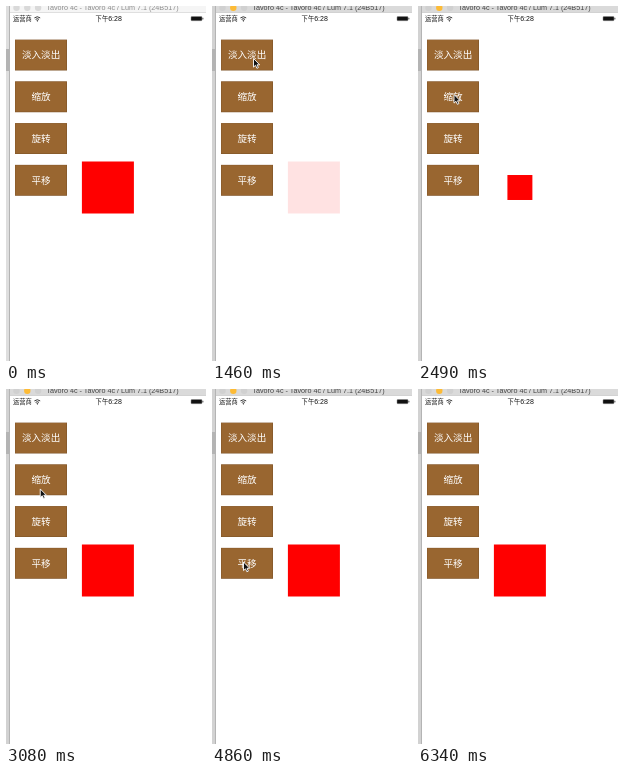
An HTML page for the animation above (6.99 s loop, 200 px wide and 355 px high).

```html
<!DOCTYPE html>
<html lang="zh">
<head>
<meta charset="utf-8">
<style>
  html, body { margin: 0; width: 100%; height: 100%; overflow: hidden; background: #fff; }
  svg { display: block; width: 100vw; height: 100vh; }
  text { font-family: "Noto Sans CJK SC", "Noto Sans CJK", "Noto Sans", sans-serif; }
  .latin { font-family: "Liberation Sans", sans-serif; }
</style>
</head>
<body>
<svg viewBox="0 0 200 355">
  <rect width="200" height="355" fill="#fff"/>
  <rect id="strip" width="3" height="355"/>
  <rect y="43" width="3" height="22" fill="#b4b4b4"/>
  <rect x="3" width="1" height="355" fill="#b4b4b4"/>
  <rect id="bar" x="4" width="196" height="7"/>
  <rect x="4" y="6.5" width="196" height=".5" fill="#c8c8c8"/>
  <g id="dots"></g>
  <text id="title" class="latin" x="106.5" y="4.4" font-size="7.2" text-anchor="middle">Tavoro 4c - Tavoro 4c / Lum 7.1 (24B517)</text>

  <g font-size="6.3" fill="#111">
    <text x="7" y="15.2">运营商</text>
    <text x="102.7" y="15.2" text-anchor="middle">下午<tspan class="latin" font-size="7">6:28</tspan></text>
  </g>
  <g fill="none" stroke="#222" stroke-width=".9">
    <path d="M28.4 11.9Q31.3 9.6 34.2 11.9M29.6 13.4Q31.3 12 33 13.4"/>
    <circle cx="31.3" cy="14.8" r=".4"/>
  </g>
  <rect x="185" y="10.5" width="11" height="4.2" rx=".8" fill="#111" stroke="#888" stroke-width=".5"/>
  <rect x="196.5" y="11.8" width=".8" height="1.6" fill="#222"/>

  <g id="buttons"></g>
  <rect id="square" x="-26" y="-26" width="52" height="52" fill="#f00"/>
  <path id="cursor" d="M0 0V8.6L2 6.8L3.4 9.8L4.9 9.1L3.5 6.3H6.2Z" fill="#111" stroke="#fff" stroke-width=".9" stroke-linejoin="round"/>
</svg>
<script>
const LOOP = 6990, STEP = 147, HALF = 270, TRAVEL = 440;
const $ = id => document.getElementById(id);

const scenes = [
  { from: 450, to: 890, x: 41.5, y: 52.5 },
  { from: 1310, to: 2190, x: 36, y: 88.5 },
  { from: 2490, to: 3370, x: 29.5, y: 131 },
  { from: 3670, to: 4560, x: 31.5, y: 173 },
  { from: 4860, to: 5890, x: 169, y: 329 },
  { from: 6040, to: 6340, x: 180, y: 354 }
];
const entry = { x: 155, y: 125 };

$("dots").innerHTML = [0, 1, 2].map(i =>
  `<circle cx="${10.5 + i * 10.8}" cy="1.7" r="3.2"/>`).join("");

$("buttons").innerHTML = ["淡入淡出", "缩放", "旋转", "平移"].map((label, i) => {
  const y = 33.6 + i * 41.75;
  return `<rect x="9" y="${y}" width="52" height="30.9" fill="#7f5428"/>
    <rect x="9.4" y="${y + .4}" width="51" height="29.9" fill="#996630"/>
    <text x="35.1" y="${y + 18.7}" font-size="9.6" fill="#fff" text-anchor="middle">${label}</text>`;
}).join("");

const clamp = x => Math.min(1, Math.max(0, x));
const ease = x => x * x * (3 - 2 * x);
// Eased 0 → 1 → 0
const pulse = (t, start) => ease(clamp(1 - Math.abs((t - start) / HALF - 1)));

function snap(t) {
  const scene = scenes.findLast(s => s.from <= t);
  if (!scene) return 0;
  const { from, to } = scene;
  const count = Math.round((to - from) / STEP);
  const at = i => Math.round((from + (to - from) * i / count) / 10) * 10;
  let i = count;
  while (at(i) > t) i--;
  return at(i);
}

function pointer(t) {
  let { x, y } = entry;
  for (const s of scenes) {
    const k = ease(clamp((t - s.to) / TRAVEL + 1));
    x += (s.x - x) * k;
    y += (s.y - y) * k;
  }
  return [x, y];
}

function draw(time) {
  const t = snap(time);
  const active = t >= 1310;
  $("strip").setAttribute("fill", active ? "#d2d2d2" : "#dedede");
  $("bar").setAttribute("fill", active ? "#dadada" : "#f5f5f5");
  $("title").setAttribute("fill", active ? "#444" : "#8c8c8c");
  $("dots").setAttribute("fill", active ? "#d0d0d0" : "#d9d9d9");
  $("dots").children[1].setAttribute("fill", active ? "#fdbb35" : "#d9d9d9");

  const alpha = 1 - .9 * pulse(t, 1210);
  const scale = 1 - .9 * pulse(t, 2341);
  const angle = 30 * pulse(t, 3700);
  const drop = 52.3 * pulse(t, 4880);
  $("square").setAttribute("opacity", alpha);
  $("square").setAttribute("transform",
    `translate(101.9 ${181.5 + drop}) rotate(${angle}) scale(${scale})`);

  const shown = t >= scenes[0].from && t < scenes.at(-1).to;
  $("cursor").setAttribute("visibility", shown ? "visible" : "hidden");
  $("cursor").setAttribute("transform", `translate(${pointer(t)})`);
}

const origin = performance.now();
function tick() {
  draw((performance.now() - origin) % LOOP);
  requestAnimationFrame(tick);
}
tick();
</script>
</body>
</html>
```
